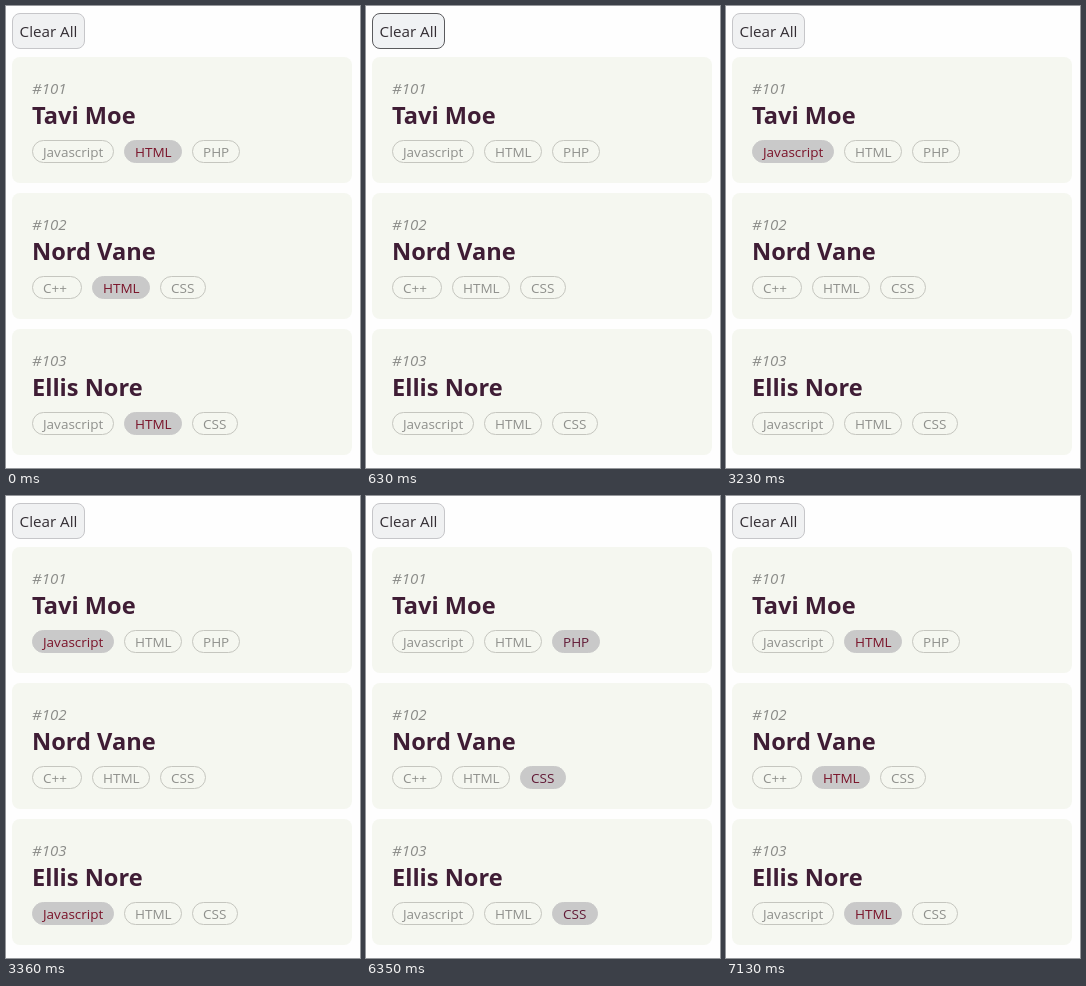
An HTML page that plays this animation: 354x462 px, repeating every 8000 ms.

```html
<!DOCTYPE html>
<html lang="en">
<head>
<meta charset="utf-8">
<title>Tag filter</title>
<style>
  html, body { margin: 0; width: 100%; height: 100%; overflow: hidden; background: #fefefe; }
  svg { display: block; width: 354px; height: 462px; font-family: "Open Sans", "Noto Sans", sans-serif; }
  .clear rect { fill: #f0f1f2; stroke: #c6c6c9; }
  .clear.focus rect { fill: #f0f2f4; stroke: #5a5a5d; }
  .clear text { font-size: 15.2px; text-anchor: middle; fill: #332d33; }
  .card { fill: #f5f7f0; }
  .id { font-size: 15px; font-style: italic; fill: #8b8c89; }
  .name { font-size: 23.6px; font-weight: 700; fill: #3f1d35; }
  .tag rect { fill: none; stroke: #c5c6bf; }
  .tag text { font-size: 13.5px; fill: #8f908c; }
  .tag.on rect { fill: #c9c9c9; stroke: #c9c9c9; }
  .tag.on text { fill: #7a1329; }
  .tag.on.short text { fill: #621a36; }
</style>
</head>
<body>
<svg id="stage" viewBox="0 0 354 462"></svg>
<script>
const people = [
  { name: "Tavi Moe", tags: ["Javascript", "HTML", "PHP"] },
  { name: "Nord Vane", tags: ["C++", "HTML", "CSS"] },
  { name: "Ellis Nore", tags: ["Javascript", "HTML", "CSS"] }
];
const tagWidth = { "Javascript": 82, "HTML": 58, "PHP": 48, "C++": 50, "CSS": 46 };

// Each step: start in ms, selected tag per card, button focus.
const steps = [
  [0, ["HTML", "HTML", "HTML"], false],
  [500, ["HTML", "HTML", "HTML"], true],
  [630, ["", "", ""], true],
  [3100, ["", "", ""], false],
  [3230, ["Javascript", "", ""], false],
  [3360, ["Javascript", "Javascript", "Javascript"], false],
  [5050, ["CSS", "CSS", "CSS"], false],
  [6350, ["PHP", "CSS", "CSS"], false],
  [6480, ["PHP", "PHP", "PHP"], false],
  [7130, ["HTML", "HTML", "HTML"], false]
];
const duration = 8000;

function add(parent, type, attrs, text = "") {
  const node = document.createElementNS("http://www.w3.org/2000/svg", type);
  for (const key in attrs) node.setAttribute(key, attrs[key]);
  node.textContent = text;
  return parent.appendChild(node);
}

function box(parent, x, y, width, height, rx) {
  add(parent, "rect", { x: x + .5, y: y + .5, width: width - 1, height: height - 1, rx });
}

const stage = document.getElementById("stage");
const clear = add(stage, "g", { class: "clear" });
box(clear, 6, 7, 73, 36, 7.5);
add(clear, "text", { x: 42.5, y: 31 }, "Clear All");

const tags = [];
people.forEach((person, card) => {
  const top = 51 + card * 136;
  add(stage, "rect", { x: 6, y: top, width: 340, height: 126, rx: 8, class: "card" });
  add(stage, "text", { x: 26, y: top + 37, class: "id" }, "#" + (101 + card));
  add(stage, "text", { x: 26, y: top + 67, class: "name" }, person.name);
  let x = 26;
  for (const label of person.tags) {
    const width = tagWidth[label];
    const node = add(stage, "g", { class: "tag" });
    node.classList.toggle("short", label.length === 3);
    box(node, x, top + 83, width, 23, 11);
    add(node, "text", { x: x + 11, y: top + 100 }, label);
    tags.push({ node, card, label });
    x += width + 10;
  }
});

let shown;
function show(step) {
  if (step === shown) return;
  shown = step;
  const [, selected, focused] = step;
  clear.classList.toggle("focus", focused);
  for (const { node, card, label } of tags)
    node.classList.toggle("on", selected[card] === label);
}

const start = performance.now();
function tick() {
  const time = (performance.now() - start) % duration;
  show(steps.findLast(step => step[0] <= time));
  requestAnimationFrame(tick);
}
tick();
</script>
</body>
</html>
```
